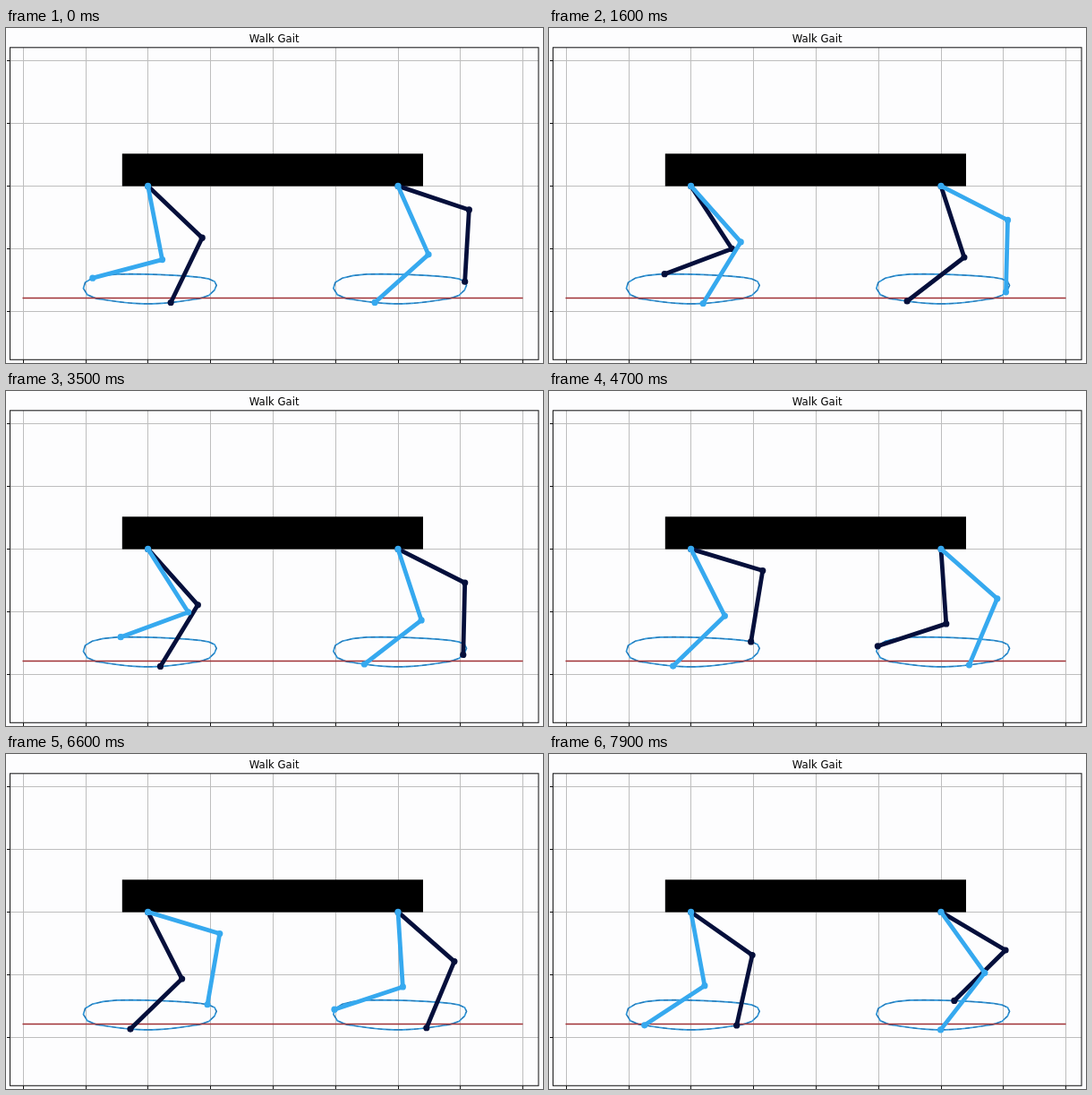
Animation of 600x374 px, one loop 8 s. Source, as an HTML page:

```html
<!DOCTYPE html>
<html lang="en">
<head>
<meta charset="utf-8">
<title>Walk Gait</title>
<style>
  html, body { margin: 0; width: 100%; height: 100%; overflow: hidden; background: #fdfdfe; }
  svg { display: block; width: 600px; height: 374px; }
  text { font: 11.7px "DejaVu Sans", sans-serif; text-anchor: middle; }
  path, polygon { fill: none; }
  #grid, #ticks { shape-rendering: crispEdges; }
  .leg path { stroke-width: 4.8; stroke-linejoin: round; stroke-linecap: round; }
</style>
</head>
<body>
<svg viewBox="0 0 600 374">
  <text x="299.7" y="16.2">Walk Gait</text>
  <path id="grid" stroke="#bebebe"/>
  <path id="ticks" stroke="#111"/>
  <rect x="4.5" y="21.8" width="590.5" height="348.5" fill="none" stroke="#222" stroke-width="1.1"/>
  <g id="loops"></g>
  <path d="M18.5 301.5H577.5" stroke="#a03034" stroke-width="1.4"/>
  <rect x="129.8" y="140.3" width="336.2" height="36.3"/>
  <g id="legs"></g>
</svg>
<script>
const THIGH = 83.7, SHIN = 80.4, HIP_Y = 176.4, REAR = 158.6, FRONT = 438;
const LIGHT = '#36a9ef', DARK = '#050f3b';
const $ = id => document.getElementById(id);

// Stride: a steady push on the ground, then a Bezier swing through the air
const REACH = 56, GROUND = 125.8, SINK = 5.7, LIFT = 28.4, STANCE = .544;
const swingX = [1, 1.4, 1.5, 1.5, 1.5, 0, 0, 0, -1.5, -1.5, -1.4, -1];
const swingY = swingX.map((_, i) => i < 2 || i > 9 ? 0 : i < 7 ? .9 : 1.1);

function bezier(points, t) {
  while (points.length > 1) points = points.slice(1).map((p, i) => points[i] + (p - points[i]) * t);
  return points[0];
}

// Foot relative to the hip; phase 0 is the middle of the push
function footAt(phase) {
  const u = (phase + STANCE / 2) % 1;
  if (u < STANCE) {
    const s = 2 * u / STANCE - 1;
    return [REACH * s, GROUND + SINK * Math.cos(Math.PI / 2 * s)];
  }
  const t = (u - STANCE) / (1 - STANCE);
  return [REACH * bezier(swingX, t), GROUND - LIFT * bezier(swingY, t)];
}

function kneeFor([x, y]) {
  const reach = Math.hypot(x, y);
  const bend = Math.acos((THIGH ** 2 + reach ** 2 - SHIN ** 2) / (2 * THIGH * reach));
  const angle = Math.atan2(y, x) - bend;
  return [THIGH * Math.cos(angle), THIGH * Math.sin(angle)];
}

// [tenths of a second, strides]: the pace is slightly uneven
const PACE = [[0, .624], [8, .872], [24, 1.26], [47, 1.903], [79, 2.748]];

function phaseAt(step) {
  const i = Math.max(1, PACE.findIndex(p => p[0] >= step));
  const [t0, p0] = PACE[i - 1], [t1, p1] = PACE[i];
  return p0 + (p1 - p0) * (step - t0) / (t1 - t0);
}

function add(parent, tag, attrs) {
  const el = document.createElementNS('http://www.w3.org/2000/svg', tag);
  for (const k in attrs) el.setAttribute(k, attrs[k]);
  return parent.appendChild(el);
}

let grid = '', ticks = '';
for (let i = 0; i < 9; i++) {
  const x = 19.2 + i * 69.82;
  grid += `M${x} 22V370`;
  ticks += `M${x} 370V374`;
}
for (let i = 0; i < 5; i++) {
  const y = 36.7 + i * 69.85;
  grid += `M5 ${y}H595`;
  ticks += `M1 ${y}H5`;
}
$('grid').setAttribute('d', grid);
$('ticks').setAttribute('d', ticks);

const points = Array.from({ length: 40 }, (_, i) => footAt(i / 40)).join(' ');
for (const x of [REAR, FRONT]) {
  const transform = `translate(${x} ${HIP_Y})`;
  add($('loops'), 'polygon', { points, transform, stroke: '#2f97da', 'stroke-width': 1.7 });
  add($('loops'), 'polygon', { points, transform, stroke: '#235f94', 'stroke-width': .7, 'stroke-dasharray': '5 4' });
}

const legs = [[REAR, DARK, .5], [FRONT, DARK, .75], [REAR, LIGHT, 0], [FRONT, LIGHT, .25]]
  .map(([x, color, shift]) => {
    const g = add($('legs'), 'g', { class: 'leg', transform: `translate(${x} ${HIP_Y})`, fill: color, stroke: color });
    const bones = add(g, 'path', {});
    const joints = [0, 1, 2].map(() => add(g, 'circle', { r: 3.6, stroke: 'none' }));
    return { shift, bones, joints };
  });

function draw(now) {
  const phase = phaseAt(Math.floor(now % 8000 / 100));
  for (const { shift, bones, joints } of legs) {
    const foot = footAt(phase + shift), pose = [[0, 0], kneeFor(foot), foot];
    bones.setAttribute('d', 'M' + pose.join('L'));
    joints.forEach((joint, i) => {
      joint.setAttribute('cx', pose[i][0]);
      joint.setAttribute('cy', pose[i][1]);
    });
  }
}

const start = performance.now();
function tick() {
  draw(performance.now() - start);
  requestAnimationFrame(tick);
}
tick();
</script>
</body>
</html>
```
